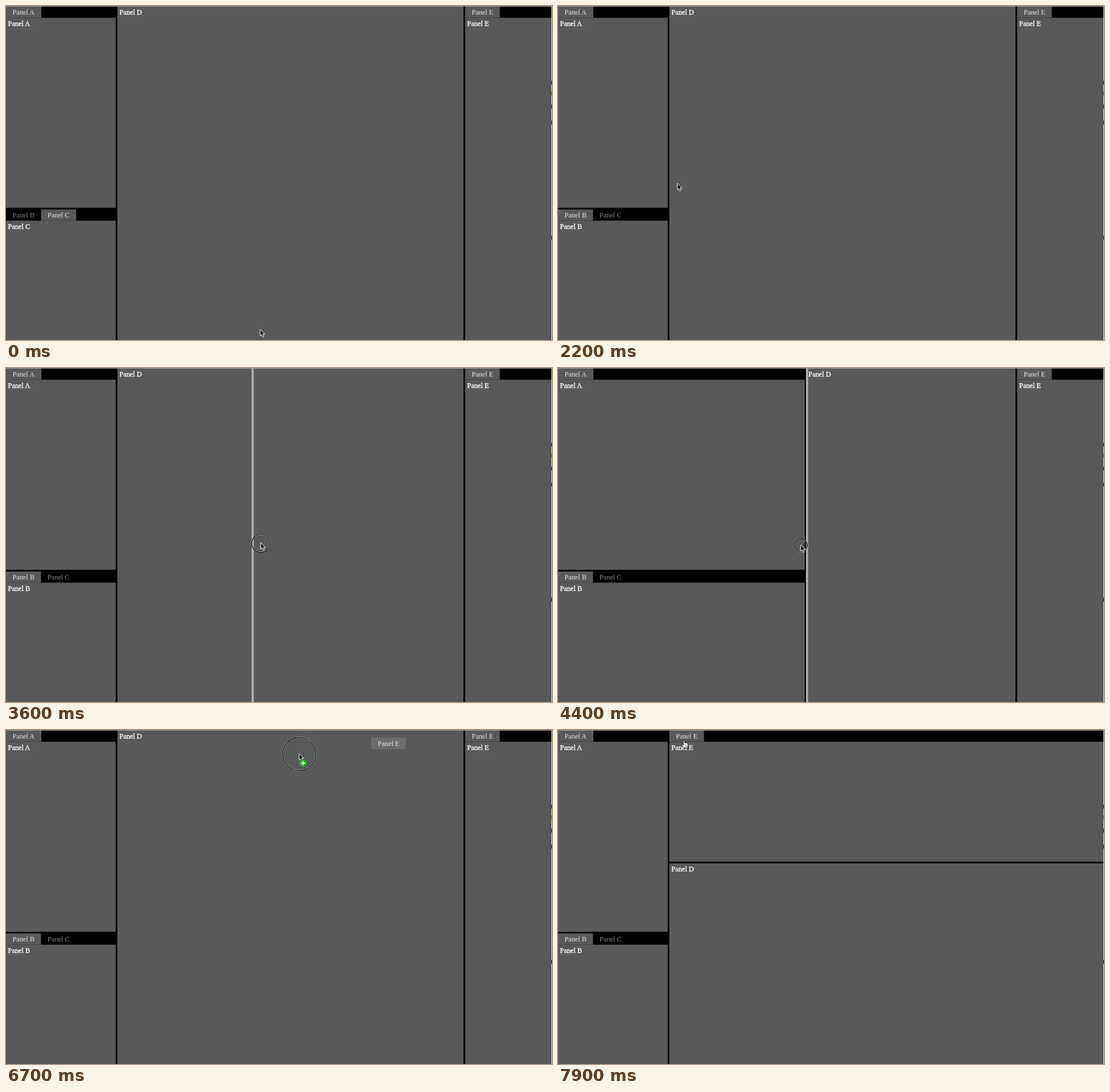
Animation of 956 by 586 pixels, one loop 8000 ms. Source, as an HTML page:

```html
<!DOCTYPE html>
<html lang="en">
<head>
<meta charset="utf-8">
<title>Dockable panels</title>
<style>
  html, body { margin: 0; width: 100%; height: 100%; overflow: hidden; background: #000; }
  svg { display: block; width: 956px; height: 586px; }
  text { font: 12.3px "Liberation Serif", "Times New Roman", serif; white-space: pre; }
  .body { fill: #fff; stroke: #fff; stroke-width: .3px; }
</style>
</head>
<body>
<svg id="stage" viewBox="0 0 956 586"></svg>
<script>
const LOOP = 8000, STEP = 100;
const GREY = '#58595b';
const TAB_H = 19.6, GAP = 3, RIGHT = 955, BOTTOM = 586;
const TAB_W = { A: 62, B: 61.3, C: 61.5, E: 60.6 };
const stage = document.getElementById('stage');

// pointer moves: start, end, x, y; each eases on from the last
const START = [445, 567.3];
const MOVES = [
  [0, 900, 39, 369],         // to tab B
  [1800, 2200, 209, 311],
  [2400, 2900, 194, 307],    // to the splitter
  [3200, 3650, 455, 306.5],  // drag it right
  [3650, 4100, 435, 310],
  [4350, 4800, 138.5, 311.5],// drag it left
  [5000, 5800, 803, 136],
  [5850, 6300, 824.5, 18],   // to tab E
  [6400, 6952, 273.5, 59],   // drag the tab
  [7550, 7900, 220.5, 18.5]
];
const PRESSES = [[890, 1160], [2800, 3658], [4320, 4858], [6400, 7300]];

const within = (t, a, b) => t >= a && t < b;
const clamp = v => Math.min(1, Math.max(0, v));
const smooth = k => k * k * (3 - 2 * k);

function pointer(t) {
  let [x, y] = START;
  for (const [from, to, nx, ny] of MOVES) {
    const k = smooth(clamp((t - from) / (to - from)));
    x += (nx - x) * k;
    y += (ny - y) * k;
  }
  return [x, y];
}

function ringSize(t) {
  const press = PRESSES.find(([a, b]) => within(t, a, b));
  return press ? 30 * clamp(Math.min((t - press[0]) / 200, (press[1] - t) / 100)) : 0;
}

const rect = (x, y, w, h, fill) =>
  `<rect x="${x}" y="${y}" width="${w}" height="${h}" fill="${fill}"/>`;

const label = (x, y, name, attrs) => `<text x="${x}" y="${y}" ${attrs}>Panel ${name}</text>`;

const tabLabel = (x, y, name, on) =>
  label(x + 11.4, y + 13.8, name, `fill="${on ? '#e2e2e2' : '#858585'}"`);

const plain = (name, x, y, right, bottom) =>
  rect(x, y, right - x, bottom - y, GREY) + label(x + 3.6, y + 14.3, name, 'class="body"');

function tabbed(names, active, x, y, right, bottom) {
  let out = rect(x, y, right - x, TAB_H, '#000');
  let left = x;
  for (const name of names) {
    const on = name === active;
    if (on) out += rect(left, y, TAB_W[name], TAB_H, GREY);
    out += tabLabel(left, y, name, on);
    left += TAB_W[name];
  }
  return out + plain(active, x, y + TAB_H, right, bottom);
}

function panels(t) {
  const left = within(t, 3700, 5000) ? 432 : 192;
  const main = left + GAP;
  const side = tabbed(['A'], 'A', 0, 1, left, 354) +
    tabbed(['B', 'C'], t < 1500 ? 'C' : 'B', 0, 357, left, BOTTOM);
  return side + (t < 7300
    ? plain('D', main, 1, 801, BOTTOM) + tabbed(['E'], 'E', 801 + GAP, 1, RIGHT, BOTTOM)
    : tabbed(['E'], 'E', main, 1, RIGHT, 231) + plain('D', main, 231 + GAP, RIGHT, BOTTOM));
}

// sliver of the page beside the app
const edge = rect(0, 0, 956, 1, '#a0a0a0') + rect(RIGHT, 0, 1, BOTTOM, '#e4e4e4') +
  [131, 173, 201, 403].map(y => rect(RIGHT, y, 1, 7, '#333')).join('') +
  rect(RIGHT, 150, 1, 7, '#83943c');

const arrow = `<path d="M0 0V11.6L2.6 9.2L4.5 13.3L6.5 12.4L4.7 8.4H8.2Z"
  fill="#111" stroke="#fff" stroke-linejoin="round"/>`;

const hand = `<path d="M-1.5 .8Q-.3 -.7 .8 .8L1.7 4.4Q3 3.3 3.9 4.5Q5.1 3.8 5.8 5
  Q7.2 4.8 7.4 6.6L7 10.2L6 12.8H.4L-3.4 8.6Q-4.2 7 -2.6 6.8L-.3 8Z"
  fill="#fff" stroke="#222" stroke-width=".9" stroke-linejoin="round"/>
  <path d="M2 9V11M3.7 9V11M5.3 9V11" stroke="#333" stroke-width=".7"/>`;

const badge = `<g transform="translate(7 17)">
  <circle r="7" fill="#2fa52b" stroke="#1f7a1d" stroke-width=".8"/>
  <path d="M-3.6 0H3.6M0 -3.6V3.6" stroke="#fff" stroke-width="2"/></g>`;

function ring(r) {
  if (r < 1) return '';
  const circle = (color, w) =>
    `<circle cx=".5" cy="1" r="${r - 1}" fill="none" stroke="${color}" stroke-width="${w}"/>`;
  return circle('rgba(255,255,255,.55)', 2.6) + circle('#151515', 1.5);
}

function splitter(t) {
  if (!within(t, 3300, 3700) && !within(t, 4400, 5000)) return '';
  return rect(Math.max(192, pointer(t - 36)[0]), 1, 3.8, 585, '#adadad');
}

function draggedTab(t) {
  if (!within(t, 6500, 7300)) return '';
  const [x, y] = pointer(t - 100);
  return `<g transform="translate(${x - 20.5} ${y - 17})">` +
    rect(0, 0, TAB_W.E, 20.4, '#6b6c6d') + tabLabel(0, .5, 'E', true) + '</g>';
}

function scene(t) {
  const [x, y] = pointer(t);
  const overTab = within(t, 900, 1900) || within(t, 6200, 6500) || t >= 7800;
  const drop = within(t, 6900, 7300) ? rect(195, 1, 606, 135, 'rgba(36,146,246,.5)') : '';
  return panels(t) + drop + splitter(t) + edge + draggedTab(t) +
    `<g transform="translate(${x} ${y})">` + ring(ringSize(t)) +
    (overTab ? hand : arrow) + (within(t, 6600, 7300) ? badge : '') + '</g>';
}

let shown = -1;
function tick() {
  const t = Math.floor(performance.now() % LOOP / STEP) * STEP;
  if (t !== shown) {
    shown = t;
    stage.innerHTML = scene(t);
  }
  requestAnimationFrame(tick);
}
tick();
</script>
</body>
</html>
```
